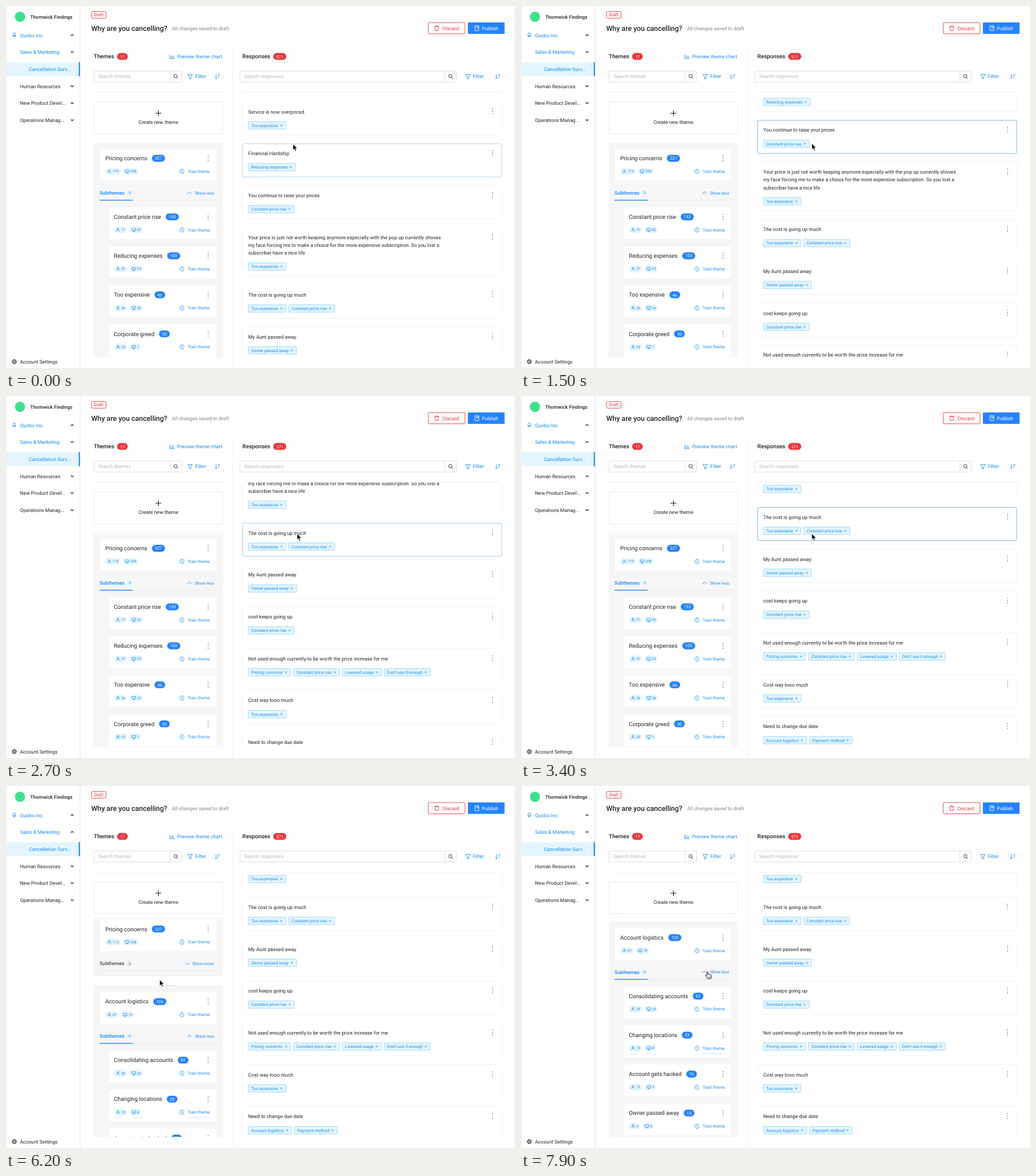
Animation, 800 px wide and 568 px high, one loop 8 s. Source, as an HTML page:

```html
<!DOCTYPE html>
<html lang="en">
<head>
<meta charset="utf-8">
<title>Survey themes</title>
<style>
html, body { margin: 0; width: 100%; height: 100%; overflow: hidden; background: #fefefe; }
svg { display: block; }
text { font-family: Roboto, "Open Sans", sans-serif; text-rendering: geometricPrecision; white-space: pre; }
</style>
</head>
<body>
<svg id="stage" width="800" height="568" viewBox="0 0 800 568">
  <defs>
    <clipPath id="themeClip"><rect x="130" y="206.5" width="220" height="344"/></clipPath>
    <clipPath id="replyClip"><rect x="366" y="136" width="420" height="414.5"/></clipPath>
  </defs>
</svg>
<script>
const LINK = '#1789f3', BLUE = '#2582ff', RED = '#ee343b', INK = '#222', PALE = '#e4f5ff',
      PAGE = '#fefefe', LINE = '#efeff0', BOX = '#d9d9d9';
const BODY = 7.78, SMALL = 6.67, HEAD = 8.89;
const stage = document.getElementById('stage');

function add(parent, tag, attrs = {}) {
  const node = document.createElementNS('http://www.w3.org/2000/svg', tag);
  for (const key in attrs) node.setAttribute(key, attrs[key]);
  return parent.appendChild(node);
}
const group = (p, x = 0, y = 0) => add(p, 'g', { transform: `translate(${x} ${y})` });
const rect = (p, x, y, width, height, fill, stroke = 'none', rx = 0) =>
  add(p, 'rect', { x, y, width, height, fill, stroke, rx, 'stroke-width': 0.8 });
const path = (p, d, stroke, width = 0.8, fill = 'none') =>
  add(p, 'path', { d, stroke, fill, 'stroke-width': width, 'stroke-linejoin': 'round' });

// cy is the middle of the capital letters
function text(p, x, cy, string, size = BODY, fill = INK, weight = 400, anchor = 'start') {
  const node = add(p, 'text', { x, y: cy + size * 0.355, fill,
    'font-size': size, 'font-weight': weight, 'text-anchor': anchor });
  node.textContent = string;
  return node;
}

const ICONS = {
  up: 'M-2.2 1.1L0-1.1L2.2 1.1',
  down: 'M-2.2-1.1L0 1.1L2.2-1.1',
  wideUp: 'M-3.4 1.8L0-1.8L3.4 1.8',
  wideDown: 'M-3.4-1.8L0 1.8L3.4-1.8',
  search: 'M1.6 1.6L3.4 3.4M2.2-.6A2.6 2.6 0 1 1-3-.6A2.6 2.6 0 1 1 2.2-.6',
  filter: 'M-3.5-3.3H3.5L1.2 .3V3.4H-1.2V.3Z',
  sort: 'M-2.3-3.6V3.4M-3.8 1.8L-2.3 3.5L-.8 1.8M.6-3H4M.6-.8H3.2M.6 1.4H2.4',
  chart: 'M-3.6-3.4V3.2H3.8M-1.7 2V-.2M.2 2V-2M2.2 2V-1',
  trash: 'M-3.5-2.4H3.5M-1.4-2.4V-3.6H1.4V-2.4M-2.7-2.4L-2.3 3.7H2.3L2.7-2.4',
  book: 'M-3-3.8H3V3.8H-3ZM-.2-3.6V-.2L1.1-1.2L2.4-.2V-3.6',
  user: 'M1.3-1.2A1.3 1.3 0 1 1-1.3-1.2A1.3 1.3 0 1 1 1.3-1.2M-2.4 2.6A2.4 2.2 0 0 1 2.4 2.6',
  screen: 'M-2.8-2.2H2.8V1.3H-2.8ZM0 1.3V2.5M-1.5 2.5H1.5',
  train: 'M2.9-1.8A3.4 3.4 0 1 0 3.1 1.5M0-2V.3L1.7 1.2M2.4-.4H3.8',
  pin: 'M-1.9-1.2A1.9 2.4 0 0 1 1.9-1.2V1.4H-1.9ZM-2.7 1.5H2.7M0 1.6V3.8',
  plus: 'M-4.5 0H4.5M0-4.5V4.5',
  cross: 'M-1.6-1.6L1.6 1.6M1.6-1.6L-1.6 1.6'
};
const icon = (p, name, x, y, color, width = 0.8) => path(group(p, x, y), ICONS[name], color, width);

function dots(p, x, y) {
  for (const d of [-3.7, 0, 3.7]) add(p, 'circle', { cx: x, cy: y + d, r: 0.72, fill: '#555' });
}
function badge(p, x, y, value, fill) {
  const w = 9.3 + 3.75 * String(value).length;
  rect(p, x, y - 5.4, w, 10.8, fill, 'none', 5.4);
  text(p, x + w / 2, y, value, SMALL, '#fff', 400, 'middle');
}
function searchBox(p, x, w, hint) {
  rect(p, x, 102, w, 17.3, '#fff', BOX, 1);
  path(p, `M${x + w - 17.7} 102V119.3`, BOX);
  icon(p, 'search', x + w - 8.8, 110.7, '#333', 0.9);
  text(p, x + 6.5, 110.7, hint, BODY, '#b9b9b9');
}
function filters(p, x, sortX) {
  icon(p, 'filter', x, 110.7, LINK);
  text(p, x + 7.7, 110.7, 'Filter', BODY, LINK);
  icon(p, 'sort', sortX, 110.7, LINK);
}

function drawSidebar() {
  const p = group(stage);
  rect(p, 0, 0, 116, 568, '#fff');
  path(p, 'M116.4 0V568', '#e6e6e8', 1);
  path(p, 'M.2 0V568', '#cfcfd2', 0.5);
  add(p, 'circle', { cx: 22, cy: 17, r: 8, fill: '#3fe08c' });
  text(p, 38, 17, 'Thornwick Findings', 7.6, INK, 500);
  rect(p, 0, 88.2, 116, 22, PALE);
  rect(p, 114.3, 88.2, 1.9, 22, BLUE);
  icon(p, 'pin', 13, 45.6, LINK);
  const rows = [['Quobo Inc.', 22, 46, 'up'], ['Sales & Marketing', 22, 72.5, 'up'],
    ['Cancellation Surv...', 36, 99.2], ['Human Resources', 22, 126, 'down'],
    ['New Product Devel...', 22, 152.6, 'down'], ['Operations Manag...', 22, 179.2, 'down']];
  for (const [label, x, y, arrow] of rows) {
    text(p, x, y, label, BODY, y < 110 ? LINK : INK);
    if (arrow) icon(p, arrow, 104, y - 0.3, INK, 1.1);
  }
  add(p, 'circle', { cx: 13, cy: 558, r: 3, fill: 'none', stroke: '#333', 'stroke-width': 1.5, 'stroke-dasharray': '1.7 .66' });
  add(p, 'circle', { cx: 13, cy: 558, r: 2.3, fill: '#fff', stroke: '#333', 'stroke-width': 0.7 });
  add(p, 'circle', { cx: 13, cy: 558, r: 0.9, fill: 'none', stroke: '#333', 'stroke-width': 0.6 });
  text(p, 22, 558, 'Account Settings');
}

function drawHeader() {
  const p = group(stage);
  rect(p, 134.3, 8.6, 23, 10.6, '#fff8f7', RED, 2);
  text(p, 145.8, 14, 'Draft', SMALL, RED, 400, 'middle');
  text(p, 134, 35, 'Why are you cancelling?', 11.12, INK, 500);
  text(p, 261, 35.2, 'All changes saved to draft', BODY, '#858585');
  rect(p, 663.8, 26, 57.5, 17.6, '#fff', RED, 1);
  icon(p, 'trash', 677, 34.8, RED);
  text(p, 686, 34.8, 'Discard', BODY, RED);
  rect(p, 726, 25.8, 57.6, 18, BLUE, 'none', 1);
  icon(p, 'book', 740, 34.8, '#fff');
  text(p, 748, 34.8, 'Publish', BODY, '#fff');
  path(p, 'M356.3 65V568', LINE);

  text(p, 138, 79.2, 'Themes', HEAD, INK, 500);
  badge(p, 174.6, 79.2, 17, RED);
  icon(p, 'chart', 261, 79.4, LINK);
  text(p, 269, 79.4, 'Preview theme chart', BODY, LINK);
  searchBox(p, 138.4, 137.3, 'Search themes');
  filters(p, 289.5, 332.5);
  path(p, 'M138 135H341M372 135H779', '#e9e9ea');

  text(p, 371.6, 79.2, 'Responses', HEAD, INK, 500);
  badge(p, 420, 79.2, 571, RED);
  searchBox(p, 367.8, 339.7, 'Search responses');
  filters(p, 726, 773);

  rect(p, 138.4, 150.6, 202.2, 49.8, '#fff', '#e8e8e9', 1);
  icon(p, 'plus', 239.5, 168.2, INK, 1);
  text(p, 239.5, 182.6, 'Create new theme', BODY, INK, 400, 'middle');
}

function stat(p, x, y, kind, value) {
  const w = 14.5 + 3.15 * String(value).length;
  rect(p, x, y - 5.3, w, 10.6, PALE, 'none', 5.3);
  icon(p, kind, x + 6.5, y, LINK, 0.7);
  text(p, x + 11.7, y, value, 5.6, LINK);
  return x + w + 4;
}
function themeCard(p, x, y, [name, count, users, screens]) {
  rect(p, x, y, 331.5 - x, 51.5, '#fff', LINE, 1);
  const title = text(p, x + 8.9, y + 15.8, name, HEAD);
  badge(p, x + 8.9 + title.getComputedTextLength() + 7.3, y + 15.8, count, BLUE);
  dots(p, 317.7, y + 15.8);
  stat(p, stat(p, x + 8.9, y + 36.3, 'user', users), y + 36.3, 'screen', screens);
  icon(p, 'train', 276.7, y + 36.3, LINK);
  text(p, 285.2, y + 36.3, 'Train theme', SMALL, LINK);
}
function subHead(p, count, open) {
  const g = group(p);
  text(g, 147, 79, 'Subthemes', BODY, open ? LINK : INK, open ? 500 : 400);
  rect(g, 189.6, 74.2, 9.6, 9.6, open ? PALE : '#ececee', 'none', 4.8);
  text(g, 194.4, 79, count, 5.6, open ? LINK : '#666', 400, 'middle');
  icon(g, open ? 'wideUp' : 'wideDown', open ? 288.3 : 285, 79, LINK);
  text(g, open ? 297 : 293, 79, open ? 'Show less' : 'Show more', SMALL, LINK);
  path(g, 'M147 90.6H331.5', '#e6e6e8');
  if (open) path(g, 'M147 90.4H199.3', BLUE, 1.3);
  return g;
}
// The strip above each group hides whatever the group slides over.
function themeGroup(p, main, subs) {
  const g = group(p);
  rect(g, 137, -14.5, 206, 14.6, PAGE);
  rect(g, 138, 0, 203, 480, '#f6f6f7');
  themeCard(g, 147, 9, main);
  const open = subHead(g, subs.length, true), shut = subHead(g, subs.length, false);
  shut.style.display = 'none';
  subs.forEach((sub, i) => themeCard(g, 160.6, 100.8 + 61.2 * i, sub));
  return { g, open, shut };
}

const TAG_WIDTH = { 'Too expensive': 59, 'Reducing expenses': 73.6, 'Constant price rise': 72,
  'Owner passed away': 75.6, 'Pricing concerns': 66.4, 'Lowered usage': 61.4,
  "Don't use it enough": 72.3, 'Account logistics': 68, 'Payment method': 66.8 };
const REPLIES = [
  ['Service is now overpriced.', 'Too expensive'],
  ['Financial Hardship', 'Reducing expenses'],
  ['You continue to raise your prices', 'Constant price rise'],
  ['Your price is just not worth keeping anymore especially with the pop up currently shoves|iny face forcing me to make a choice for the more expensive subscription. So you lost a|subscriber have a nice life', 'Too expensive'],
  ['The cost is going up much', 'Too expensive', 'Constant price rise'],
  ['My Aunt passed away', 'Owner passed away'],
  ['cost keeps going up', 'Constant price rise'],
  ['Not used enough currently to be worth the price increase for me', 'Pricing concerns', 'Constant price rise', 'Lowered usage', "Don't use it enough"],
  ['Cost way tooo much', 'Too expensive'],
  ['Need to change due date', 'Account logistics', 'Payment method']
];

function drawReplies(p) {
  let top = 150.4;
  return REPLIES.map(([words, ...tags]) => {
    const lines = words.split('|'), height = 39.7 + 12.25 * lines.length, g = group(p, 0, top);
    rect(g, 372.2, 0, 406.8, height, '#fff', '#f1f1f2', 1);
    const glow = rect(g, 371.8, 0, 407.4, height, 'none', '#8fc1f0', 1);
    glow.setAttribute('stroke-width', 1);
    lines.forEach((line, i) => text(g, 380.8, 15.4 + 12.25 * i, line));
    dots(g, 764.7, 14.6);
    let x = 381;
    const cy = height - 15.1;
    for (const tag of tags) {
      const w = TAG_WIDTH[tag];
      rect(g, x, cy - 5.8, w, 11.6, PALE, '#91d5ff', 1);
      text(g, x + 4.2, cy, tag, SMALL, LINK);
      icon(g, 'cross', x + w - 7.2, cy, LINK, 0.7);
      x += w + 4.6;
    }
    const card = { top, height, glow };
    top += height + 13.75;
    return card;
  });
}

drawSidebar();
drawHeader();

const themePane = add(stage, 'g', { 'clip-path': 'url(#themeClip)' });
const themeList = group(themePane);
const pricing = themeGroup(themeList, ['Pricing concerns', 327, 119, 208], [
  ['Constant price rise', 153, 71, 82], ['Reducing expenses', 100, 37, 63],
  ['Too expensive', 46, 26, 20], ['Corporate greed', 30, 23, 7], ['Price increase', 12, 8, 4]]);
const account = themeGroup(themeList, ['Account logistics', 126, 47, 79], [
  ['Consolidating accounts', 62, 29, 33], ['Changing locations', 23, 15, 8],
  ['Account gets hacked', 16, 12, 4], ['Owner passed away', 15, 9, 6],
  ['Account changes', 6, 4, 2], ['Login trouble', 4, 3, 1]]);
add(account.g, 'path', { d: 'M172 207.2H182M197 207.2H213M286 207.2H321', stroke: '#a9d6fa',
  'stroke-width': 0.8, 'stroke-dasharray': '3 1.4' });

const replyPane = add(stage, 'g', { 'clip-path': 'url(#replyClip)' });
const replyList = group(replyPane);
const cards = drawReplies(replyList);

const arrow = group(stage), hand = group(stage);
path(arrow, 'M0 0V9.6L2.2 7.6L3.7 11.2L5.4 10.5L3.9 7H6.9Z', '#fff', 0.7, '#000');
path(hand, 'M-1 .9Q-1-.5 0-.5Q1-.5 1 .9V3.6L4.9 4.4Q6.4 4.8 6.2 6.4L5.4 10.4H.2L-3 6.4Q-3.6 5.2-2.4 4.9L-1 5.8Z', '#111', 0.9, '#fff');
path(hand, 'M1.1 7V9M2.7 7V9M4.3 7V9', '#111', 0.6);

// Tables of [time, value, ...]
const REPLY_SCROLL = [[200, 0], [700, 32], [1200, 86], [1500, 102.5], [1600, 114], [1900, 167.6], [2300, 196], [2700, 238.2], [3100, 262.9]];
const THEME_SCROLL = [[5700, 0], [6200, 14.6], [6500, 38], [7000, 104], [7300, 115.1]];
const ACCOUNT_TOP = [[4800, 635], [4900, 480], [5000, 370], [5100, 328.1]];
const POINTER = [[-250, 451, 208], [-100, 451, 216.6], [200, 451, 216.6], [1500, 457, 215.6], [1900, 458, 216.6],
  [2700, 457.5, 216], [3400, 457, 216], [3800, 380, 250], [4300, 290.5, 291.4], [5100, 290.5, 291.4],
  [5600, 245, 302], [6200, 241.5, 304], [7300, 250, 301], [7700, 293.2, 291.8]];
const FOLD_AT = 4800, LOOP = 8000;

function at(keys, t, i = 1) {
  const k = keys.findIndex(key => key[0] > t);
  if (k < 0) return keys[keys.length - 1][i];
  if (k === 0) return keys[0][i];
  const a = keys[k - 1], b = keys[k];
  return a[i] + (b[i] - a[i]) * (t - a[0]) / (b[0] - a[0]);
}
const move = (g, x, y) => g.setAttribute('transform', `translate(${x} ${y})`);

function hovers(card, t) {
  const x = at(POINTER, t), y = at(POINTER, t, 2) + at(REPLY_SCROLL, t);
  return x > 372 && y > card.top && y < card.top + card.height;
}

function draw(t) {
  move(replyList, 0, -at(REPLY_SCROLL, t));
  for (const card of cards) {
    let sum = 0;
    for (let k = 0; k < 6; k++) sum += hovers(card, t - 50 * k);
    card.glow.setAttribute('opacity', sum / 6);
  }
  const folded = t >= FOLD_AT;
  pricing.open.style.display = folded ? 'none' : '';
  pricing.shut.style.display = folded ? '' : 'none';
  move(themeList, 0, -at(THEME_SCROLL, t));
  move(pricing.g, 0, 214.2);
  move(account.g, 0, at(ACCOUNT_TOP, t));

  const x = at(POINTER, t), y = at(POINTER, t, 2);
  const onLink = x > 281 && x < 328 && y > 286 && y < 299;
  arrow.style.display = onLink ? 'none' : '';
  hand.style.display = onLink ? '' : 'none';
  move(arrow, x, y);
  move(hand, x, y);
}

const start = performance.now();
function tick() {
  const t = (performance.now() - start) % LOOP;
  draw(Math.floor(t / 100) * 100);
  requestAnimationFrame(tick);
}
tick();
</script>
</body>
</html>
```
